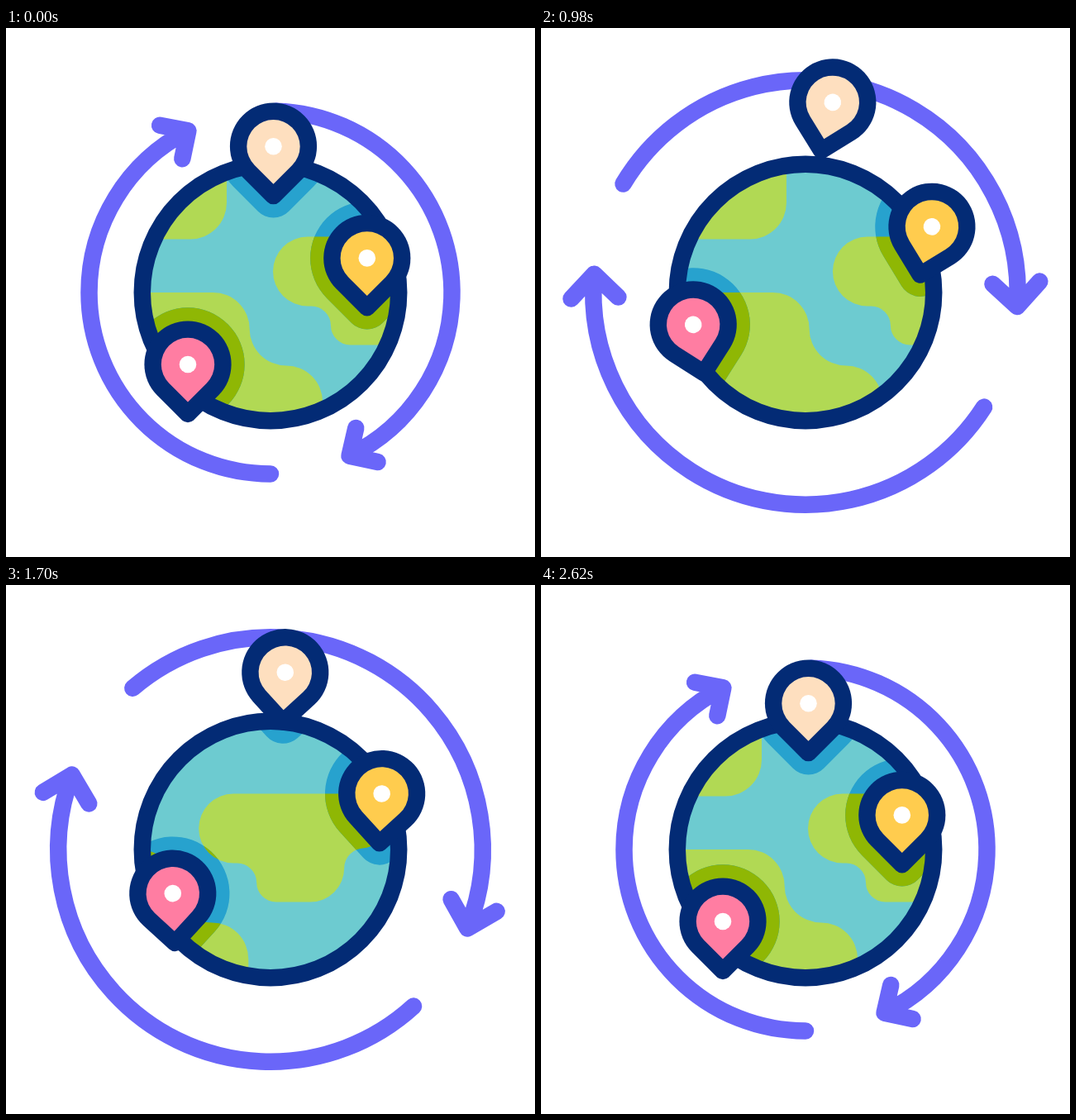
Recreate the animation shown at these times as an HTML page with a canvas. Size 640x640 px, loop 3000 ms.

```html
<!DOCTYPE html>
<html lang="en">
<head>
<meta charset="utf-8">
<title>Globe with pins</title>
<style>
  html, body { margin: 0; width: 100%; height: 100%; overflow: hidden; background: #fff; }
  canvas { display: block; width: 100vw; height: 100vh; }
</style>
</head>
<body>
<canvas id="stage" width="640" height="640"></canvas>
<script>
const ctx = document.getElementById('stage').getContext('2d');
const LOOP = 3000, TAU = Math.PI * 2, RAD = Math.PI / 180;
const NAVY = '#032b75', PURPLE = '#6a66f9';
const LIGHT = { water: '#6dcbd0', land: '#b1d954' };
const SHADE = { water: '#27a2ce', land: '#8fb704' };

const MAP_WIDTH = 460;
const land = new Path2D(
  // north west
  'M138 202.5 H172 a30 30 0 0 0 30 -30 V150 H267 V211.5 a44 44 0 0 1 -44 44 H138 a26.5 26.5 0 0 1 0 -53z' +
  // east
  'M365 252.5 H519 a33 33 0 0 1 0 66 H523 a24 24 0 0 0 -24 24 a41 41 0 0 1 -41 41 H416.5' +
  'a23.5 23.5 0 0 1 -23.5 -23.5 a23.5 23.5 0 0 0 -23.5 -23.5 H365 a42 42 0 0 1 0 -84z' +
  // south west
  'M133 352.5 a32.5 32.5 0 0 1 32.5 -32.5 H250.5 a44.2 44.2 0 0 1 44.2 44.2 a44.2 44.2 0 0 0 44.2 44.2' +
  'a44.2 44.2 0 0 1 44.2 44.2 V500 H220 V469.5 a30 30 0 0 0 -30 -30 H107 a31.5 31.5 0 0 1 0 -63 H109 a24 24 0 0 0 24 -24z'
);

// x, y: resting tip; dx, dy, turn: travel at the far end; bowX, bowY: bend of the way out
const HEAD = 60;
const pins = [
  { color: '#fedfbf', x: 323.5, y: 203.2, dx: 22.7, dy: -74, turn: 17.9, bowX: -1.7, bowY: 0 },
  { color: '#ffcc4e', x: 436.8, y: 338.4, dx: 29.6, dy: -51.2, turn: 18.4, bowX: 0, bowY: -2.3 },
  { color: '#ff7da2', x: 220, y: 467, dx: -30.8, dy: -66.8, turn: -16.8, bowX: 0, bowY: 0 }
];

const arrows = [{ tail: 90, tip: 243 }, { tail: -88.1, tip: 64.2 }];

function ease(x, a = 1 / 3, b = 2 / 3) {
  if (x <= 0) return 0;
  if (x >= 1) return 1;
  let lo = 0, hi = 1, s;
  for (let i = 0; i < 24; i++) {
    s = (lo + hi) / 2;
    const at = 3 * s * (1 - s) * ((1 - s) * a + s * b) + s * s * s;
    if (at < x) lo = s; else hi = s;
  }
  return s * s * (3 - 2 * s);
}

const span = (t, from, to, a, b) => ease((t - from) / (to - from), a, b);

function drawArrows(t) {
  const radius = 219.5 + 37.2 * (span(t, 200, 700) - span(t, 2100, 2600));
  const turn = 393.4 * span(t, 200, 2100, 0.335, 0.828) - 33.4 * span(t, 2100, 2600);
  const polar = (scale, deg) => [radius * scale * Math.cos(deg * RAD), radius * scale * Math.sin(deg * RAD)];
  ctx.save();
  ctx.translate(320, 320);
  ctx.rotate(turn * RAD);
  ctx.strokeStyle = PURPLE;
  ctx.lineWidth = 20.5;
  ctx.lineCap = ctx.lineJoin = 'round';
  for (const { tail, tip } of arrows) {
    ctx.beginPath();
    ctx.arc(0, 0, radius, tail * RAD, tip * RAD);
    ctx.moveTo(...polar(1.105, tip - 6.5));
    ctx.lineTo(...polar(1, tip));
    ctx.lineTo(...polar(0.883, tip - 6.4));
    ctx.stroke();
  }
  ctx.restore();
}

function atPin(pin, t, draw) {
  const out = span(t, 200, 1450, 0.23, 0.62);
  const move = out - span(t, 1450, 2020, 0.23, 0.62);
  const lean = out - span(t, 1450, 1780);
  const bow = 4 * out * (1 - out);
  ctx.save();
  ctx.translate(pin.x + pin.dx * move + pin.bowX * bow, pin.y + pin.dy * move + pin.bowY * bow);
  ctx.rotate(pin.turn * lean * RAD);
  draw();
  ctx.restore();
}

function addDrop(radius, round) {
  const side = radius * Math.SQRT1_2;
  ctx.moveTo(-side, side - HEAD);
  ctx.arc(0, -HEAD, radius, 0.75 * Math.PI, 0.25 * Math.PI);
  ctx.arc(0, (radius - round) * Math.SQRT2 - HEAD, round, 0.25 * Math.PI, 0.75 * Math.PI);
  ctx.closePath();
}

function fillDrop(radius, round, color) {
  ctx.beginPath();
  addDrop(radius, round);
  ctx.fillStyle = color;
  ctx.fill();
}

function drawMap(shift, colors) {
  ctx.fillStyle = colors.water;
  ctx.fillRect(150, 150, 340, 340);
  ctx.fillStyle = colors.land;
  for (const x of [shift - MAP_WIDTH, shift]) {
    ctx.save();
    ctx.translate(x, 0);
    ctx.fill(land);
    ctx.restore();
  }
}

function drawGlobe(t) {
  const shift = -52 * span(t, 200, 600) + (MAP_WIDTH + 52) * span(t, 600, 2100);
  ctx.save();
  ctx.beginPath();
  ctx.arc(320, 320, 150, 0, TAU);
  ctx.clip();
  drawMap(shift, LIGHT);
  ctx.beginPath();
  for (const pin of pins) atPin(pin, t, () => addDrop(68.7, 26.4));
  ctx.clip();
  drawMap(shift, SHADE);
  ctx.restore();

  ctx.beginPath();
  ctx.arc(320, 320, 155.2, 0, TAU);
  ctx.strokeStyle = NAVY;
  ctx.lineWidth = 20.5;
  ctx.stroke();
}

function drawPin(pin, t) {
  atPin(pin, t, () => {
    fillDrop(52.6, 10.2, NAVY);
    fillDrop(32.2, 0, pin.color);
    ctx.beginPath();
    ctx.arc(0, -HEAD, 10.3, 0, TAU);
    ctx.fillStyle = '#fff';
    ctx.fill();
  });
}

function render(now) {
  const t = now % LOOP;
  ctx.fillStyle = '#fff';
  ctx.fillRect(0, 0, 640, 640);
  drawArrows(t);
  drawGlobe(t);
  for (const pin of pins) drawPin(pin, t);
}

let start;
function tick(now) {
  start ??= now;
  render(now - start);
  requestAnimationFrame(tick);
}
render(0);
requestAnimationFrame(tick);
</script>
</body>
</html>
```
